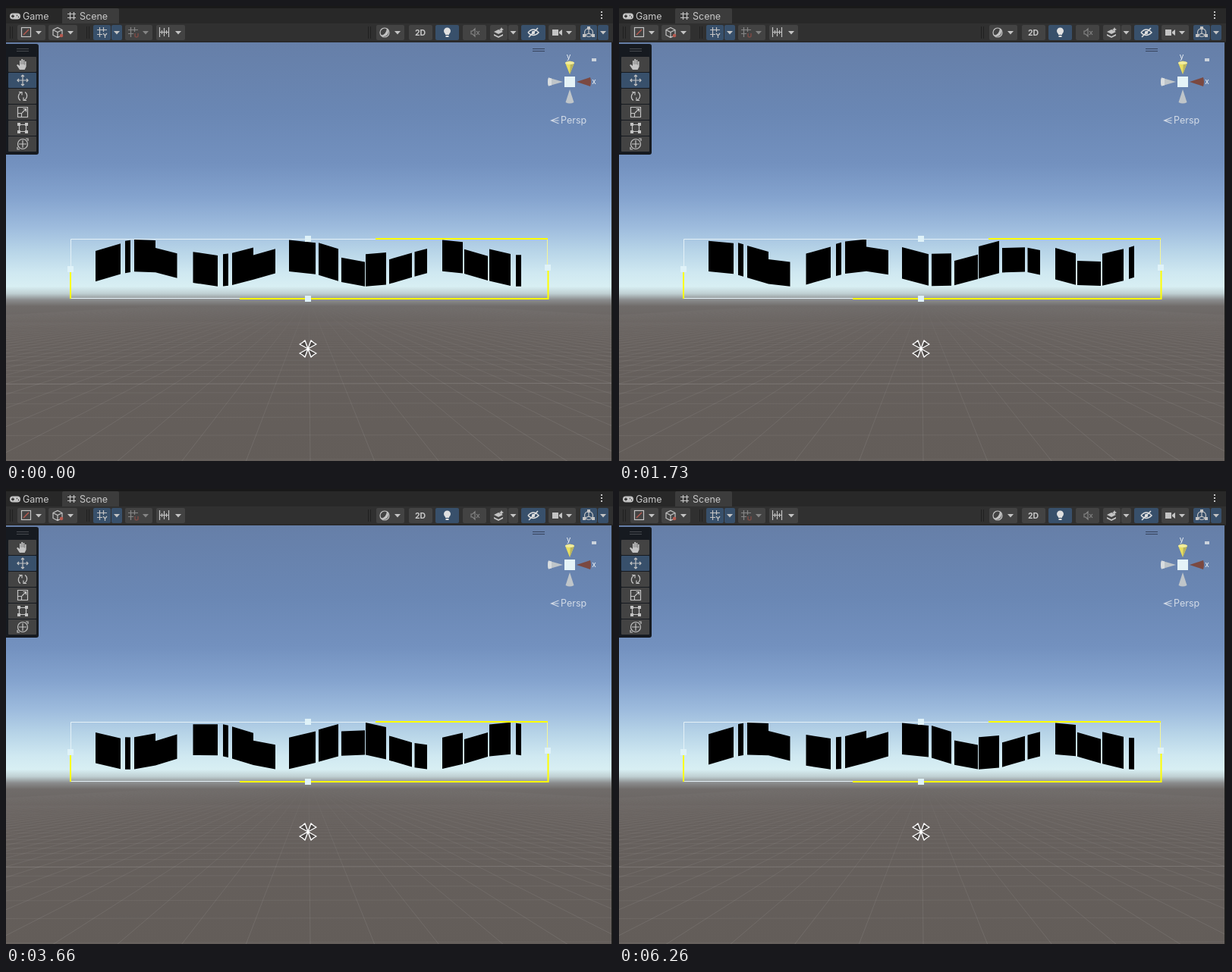
These frames come from a looping animation (800 by 600 pixels, 6.32 s). An HTML page:

```html
<!DOCTYPE html>
<html lang="en">
<head>
<meta charset="utf-8">
<title>Scene view</title>
<style>
html, body { margin: 0; width: 100%; height: 100%; overflow: hidden; background: #1f1f1f; }
svg { display: block; width: 800px; height: 600px; }
text { font-family: Inter, Roboto, sans-serif; }
.icon { fill: none; stroke: #c4c4c4; stroke-width: 1.2; }
.dim { stroke: #858585; }
.solid { fill: #c4c4c4; stroke: none; }
</style>
</head>
<body>
<svg viewBox="0 0 800 600" xmlns="http://www.w3.org/2000/svg">
  <defs>
    <linearGradient id="sky" gradientUnits="userSpaceOnUse" x1="0" y1="48" x2="0" y2="600">
      <stop offset="0" stop-color="#667fa8"/>
      <stop offset=".17" stop-color="#6a87b4"/>
      <stop offset=".29" stop-color="#7391bf"/>
      <stop offset=".37" stop-color="#84a3ce"/>
      <stop offset=".44" stop-color="#9dbbdd"/>
      <stop offset=".5" stop-color="#b8d5e8"/>
      <stop offset=".55" stop-color="#cfe8f1"/>
      <stop offset=".583" stop-color="#d8eff3"/>
      <stop offset=".6" stop-color="#bfcfd2"/>
      <stop offset=".615" stop-color="#8b8d8e"/>
      <stop offset=".63" stop-color="#706c6a"/>
      <stop offset=".68" stop-color="#67615e"/>
      <stop offset="1" stop-color="#635d59"/>
    </linearGradient>
    <linearGradient id="fade" gradientUnits="userSpaceOnUse" x1="0" y1="392" x2="0" y2="600">
      <stop offset="0" stop-color="#fff" stop-opacity="0"/>
      <stop offset=".25" stop-color="#fff" stop-opacity=".05"/>
      <stop offset="1" stop-color="#fff" stop-opacity=".09"/>
    </linearGradient>
    <clipPath id="view"><rect y="48" width="798" height="552"/></clipPath>
  </defs>

  <rect y="48" width="798" height="552" fill="url(#sky)"/>
  <g id="grid" clip-path="url(#view)"></g>

  <g id="letters" fill="#000"></g>

  <!-- selection frame -->
  <g fill="none" stroke="#e4f1f7" stroke-width="1">
    <path d="M85.5 347V307.5H487M85.5 385.5H308"/>
    <path d="M713.5 307V345" stroke="#f3f59a"/>
    <path d="M487 307H714M714.500 345V386H308M85 347V386" stroke="#ff0" stroke-width="2"/>
  </g>
  <path d="M394 303h8v8h-8zM81 343h8v8h-8zM710 341h8v8h-8zM394 382h8v8h-8z" fill="#dff2f8"/>

  <g id="pivot" transform="translate(398 452)" fill="#4b4745" stroke="#fff" stroke-width="1.4" stroke-linejoin="round"></g>

  <!-- tab strip -->
  <rect width="800" height="24" fill="#282828"/>
  <rect width="800" height="3" fill="#191919"/>
  <path d="M74 23V5q0-2 2-2h71q2 0 2 2v18z" fill="#3c3c3c"/>
  <rect y="23" width="800" height="25" fill="#303030"/>
  <rect y="46" width="800" height="2" fill="#292929"/>
  <rect x="798" y="48" width="2" height="552" fill="#1d1d1d"/>
  <g fill="#c8c8c8" font-size="12.5">
    <text x="22" y="18">Game</text>
    <text x="97" y="18">Scene</text>
  </g>
  <rect x="5" y="9.500" width="14" height="8" rx="4" class="solid"/>
  <path d="M7 13.500h4M9 11.500v4M14 12.500h1M16 14.500h1" stroke="#282828" stroke-width="1.3"/>
  <path class="icon" d="M84.500 8v10M89.500 8v10M81 10.500h11M81 15.500h11"/>
  <path class="solid" d="M784 7h2v2h-2zM784 11h2v2h-2zM784 15h2v2h-2z"/>

  <g id="buttons"></g>
  <path d="M5.500 27v16M8.500 27v16M106.500 27v16M109.500 27v16M477.500 27v16M480.500 27v16" stroke="#202020"/>

  <!-- toolbar icons -->
  <rect x="20.500" y="28.500" width="12" height="12" class="icon"/>
  <path d="M23 38l7-7" stroke="#b65a50" stroke-width="1.4"/>
  <path class="icon" d="M62 31.500l6-3 6 3v7l-6 3-6-3zM62 31.500l6 3 6-3M68 34.500v7"/>
  <circle cx="73" cy="39" r="2.300" fill="#b65a50"/>
  <path class="icon" d="M123.500 28v13M128.500 28v6M120 31.500h13M120 37.500h7M128 36l2.500 3 2.500-3M130.500 39v3"/>
  <path class="icon dim" d="M164.500 28v13M169.500 28v6M161 31.500h13M161 36.500h7"/>
  <path d="M170 36v3q0 2 2 2t2-2v-3" fill="none" stroke="#7c4b46" stroke-width="1.500"/>
  <path class="icon" d="M202.500 28v13M214.500 28v13M205.500 32v5M208.500 29v11M211.500 32v5M203 34.500h11"/>
  <circle cx="499" cy="35" r="6" class="icon"/>
  <path d="M502 29.500a6 6 0 0 1-8 9q7 0 8-9z" class="solid"/>
  <text x="546" y="39" font-size="10.500" font-weight="700" fill="#c8c8c8" text-anchor="middle">2D</text>
  <path d="M579 37q-2-2-2-4a4.500 4.500 0 0 1 9 0q0 2-2 4v1h-5zM579.500 39h4v2h-4z" fill="#e0e0e0"/>
  <path class="icon dim" d="M613 33v4h2l3 3v-10l-3 3zM620 33l4 5M624 33l-4 5"/>
  <path class="solid" d="M643 34l6-3 6 3-6 3zM643 37l6 3 6-3v2l-6 3-6-3zM653 28l1 2 2 1-2 1-1 2-1-2-2-1 2-1z"/>
  <path class="icon" style="stroke:#e0e0e0;stroke-width:1.500" d="M688 35q7-8 14 0q-7 7-14 0M689 41l12-12"/>
  <circle cx="695" cy="35" r="2.200" fill="#e0e0e0"/>
  <path class="solid" d="M720 31h8v8h-8zM729 34l4-3v8l-4-3z"/>
  <circle cx="768" cy="35" r="5.500" class="icon"/>
  <path class="icon" d="M768 28v9M768 36l-6 3M768 36l6 3"/>
  <path class="solid" d="M766 27h4v4h-4zM760 37h4v4h-4zM772 37h4v4h-4z"/>

  <!-- tool palette -->
  <path d="M0 50h40q3 0 3 3v140q0 3-3 3H0z" fill="#161a20"/>
  <path d="M14 56.500h16M14 59.500h16" stroke="#484b50"/>
  <g id="tools"></g>
  <path class="solid" d="M18 84l-4-6 1.500-1 2.500 2v-7h1.700v5h.6v-7h1.700v7h.6v-6h1.700v6.500h.6v-4.500h1.700v7l-2 4z"/>
  <path class="icon" d="M22 91v14M15 98h14M20 93l2-2 2 2M20 103l2 2 2-2M17 96l-2 2 2 2M27 96l2 2-2 2"/>
  <path class="icon" d="M19 124.500a6 6 0 0 1 1-10.500M25 113.500a6 6 0 0 1-1 10.500M17 113.500h4v4M27 124.500h-4v-4"/>
  <path class="icon" d="M15.500 133.500h13v13h-13zM15.500 141.500h5v5M21 141l5-5M22.500 135.500h4v4"/>
  <path class="icon" d="M17.500 156.500h9v9h-9z"/>
  <path class="solid" d="M15 154h4v4h-4zM25 154h4v4h-4zM15 164h4v4h-4zM25 164h4v4h-4z"/>
  <circle cx="22" cy="182" r="6.500" class="icon"/>
  <path class="icon" d="M22 177v10M17 182h10M26 175h3v3M18 189h-3v-3"/>

  <!-- orientation gizmo -->
  <path d="M694 56.500h16M694 59.500h16" stroke="#35415a"/>
  <path d="M737 75l6 15 6-15q-6-5-12 0z" fill="#e8df62"/>
  <path d="M743 90l6-15q-3-2-5-2z" fill="#b9b45f"/>
  <ellipse cx="743" cy="75" rx="6" ry="2" fill="#f1ec9d"/>
  <path d="M715 94.500q-2 5.500 0 11l19-5.500z" fill="#bfc5c9"/>
  <path d="M715 94.500q-2 5.500 0 11l4-1v-9z" fill="#d9dddf"/>
  <path d="M770 94q2 6 0 12l-18-6z" fill="#7b4941"/>
  <path d="M737.500 127q5.500 3 11 0l-5.500-17z" fill="#bfc5c9"/>
  <rect x="736" y="93" width="14" height="14" fill="#e5f3f7"/>
  <g fill="#eef2f6" font-size="10">
    <text x="741.500" y="70" text-anchor="middle">y</text>
    <text x="775" y="103" text-anchor="middle">x</text>
  </g>
  <path d="M772 69h6v4h-6z" fill="#cbd3dc"/>
  <path d="M728.500 147l-10 4 10 4M718.500 151h10" fill="none" stroke="#d2dae6" stroke-width="1.100"/>
  <text x="731" y="155" font-size="12.500" fill="#d2dae6">Persp</text>
</svg>
<script>
const LOOP = 6320, STEP = 66.56, AMP = 10, WAVE = 0.0315, ORIGIN = 129.4;
const $ = id => document.getElementById(id);

function add(parent, tag, attrs) {
  const el = document.createElementNS("http://www.w3.org/2000/svg", tag);
  for (const k in attrs) el.setAttribute(k, attrs[k]);
  return $(parent).appendChild(el);
}

// Ground grid, converging on the horizon
const EYE_X = 399, HORIZON = 385;
for (let i = -45; i <= 45; i++) {
  add("grid", "path", {
    d: `M${EYE_X} ${HORIZON}L${401 + i * 85} 601`,
    stroke: "url(#fade)", fill: "none"
  });
}
for (let n = -5; n < 28; n++) {
  const depth = 113 / (1 + n * 0.0938), y = HORIZON + depth;
  add("grid", "path", {
    d: `M0 ${y + 0.6}L798 ${y - 0.6}`, stroke: "#fff",
    "stroke-opacity": n === 0 ? 0.14 : Math.min(0.06, depth / 1500)
  });
}

// Toolbar: x, width, state (0 plain, 1 active, 2 dropdown, 3 active dropdown)
const buttons = [
  [15, 37, 2], [56, 38, 2], [115, 23, 1], [139, 14, 3], [157, 36, 2], [198, 38, 2],
  [488, 37, 2], [531, 31, 0], [566, 31, 1], [602, 31, 0], [638, 23, 0], [662, 13, 2],
  [679, 32, 1], [715, 36, 2], [757, 22, 1], [780, 14, 3]
];
for (const [x, width, state] of buttons) {
  add("buttons", "rect", { x, y: 25, width, height: 20, rx: 2, fill: state & 1 ? "#38506b" : "#434343" });
  if (state > 1) {
    const cx = width < 20 ? x + width / 2 : x + width - 9;
    add("buttons", "path", { d: `M${cx - 4} 33h8l-4 4.500z`, fill: x === 157 ? "#858585" : "#c4c4c4" });
  }
}
for (let i = 0; i < 6; i++) {
  add("tools", "rect", { x: 3, y: 67 + i * 21, width: 37, height: 20, rx: 1, fill: i === 1 ? "#38506b" : "#434343" });
}
for (const [sx, sy] of [[1, 1], [-1, 1], [-1, -1], [1, -1]]) {
  add("pivot", "path", { d: "M0 0L4-11 7.500-8 11-6z", transform: `scale(${sx} ${sy})` });
}

// Glyph blocks: left, right, resting top
const blocks = [
  [118, 151, 319.5], [157, 164, 317.5], [169, 197, 317.5], [197, 225.5, 327.5],
  [246.5, 279, 319], [286, 293, 317.5], [298, 326, 317.5], [326, 355, 327.5],
  [373, 408, 318.3], [412, 438, 317.3], [442, 473, 327.7], [474, 501, 317.3],
  [505, 535, 327.5], [538.5, 555, 327.5], [575, 602, 318.5], [604, 635, 327.7],
  [637, 665, 317.7], [672, 679, 318.3]
];
const BASE = 359.8;
const shapes = blocks.map(() => add("letters", "polygon", {}));

function draw(ms) {
  const time = Math.floor((ms % LOOP + 6) / STEP) * 0.0666;
  const shift = x => -AMP * Math.sin(time + (x - ORIGIN) * WAVE);
  blocks.forEach(([l, r, top], i) => {
    const a = shift(l), b = shift(r);
    shapes[i].setAttribute("points", `${l},${top + a} ${r},${top + b} ${r},${BASE + b} ${l},${BASE + a}`);
  });
}

const start = performance.now();
function tick() {
  draw(performance.now() - start);
  requestAnimationFrame(tick);
}
tick();
</script>
</body>
</html>
```
